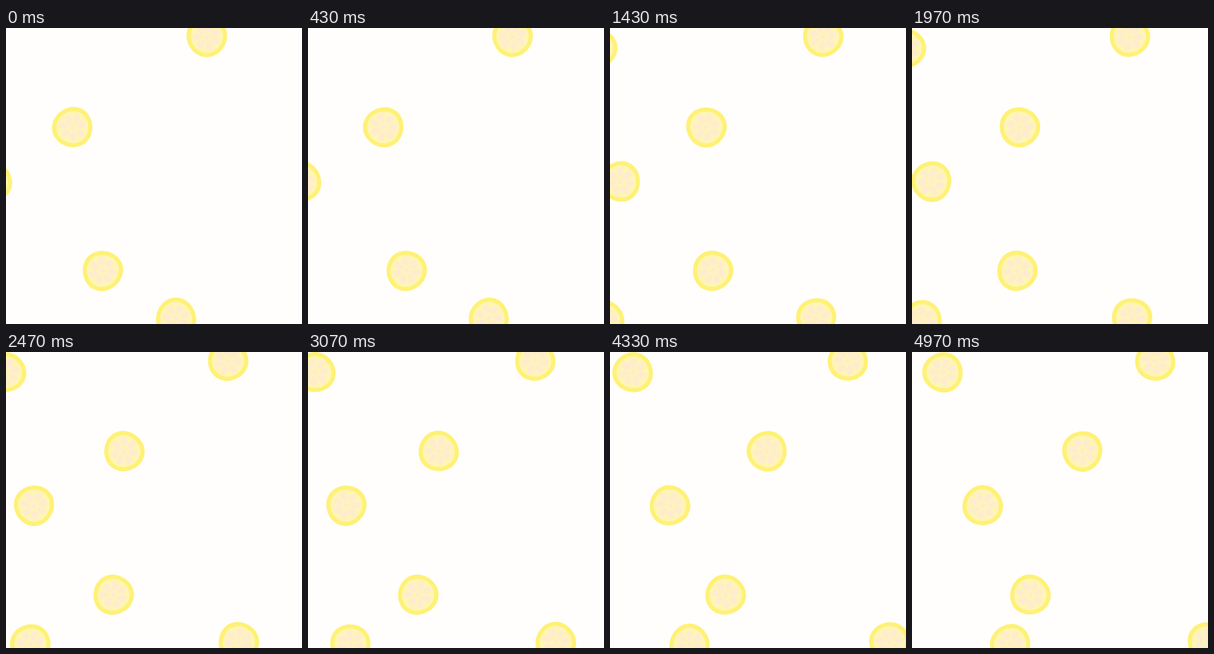
Animation of 432x432 px, one loop 5010 ms. Source, as an HTML page with a canvas:

```html
<!DOCTYPE html>
<html lang="en">
<head>
<meta charset="utf-8">
<title>Rolling lemon slices</title>
<style>
  html, body { margin: 0; width: 100%; height: 100%; overflow: hidden; background: #fffefd; }
  canvas { display: block; width: 432px; height: 432px; }
</style>
</head>
<body>
<canvas width="432" height="432"></canvas>
<script>
const ctx = document.querySelector('canvas').getContext('2d');
const LOOP = 5010, RAD = Math.PI / 180, SEEDS = 7;

// start x, y, speed in px/s, turn in degrees at x = 0
const slices = [
  [293, 12.8, 12.47, 279],
  [97, 144.8, 30.5, 75],
  [-20.6, 224, 24.9, 284],
  [141, 354.3, 6.35, 206],
  [248.2, 423.4, 36.9, 22],
  [-45, 29.7, 18.1, 15],
  [-70.6, 426.5, 43.1, 30]
];

// A circle with three soft corners
function blob(radius, color) {
  ctx.beginPath();
  for (let a = 0; a < 360; a += 4) {
    const r = radius * (1 + 0.018 * Math.cos(3 * a * RAD) + 0.007 * Math.cos(2 * a * RAD + 1));
    ctx.lineTo(r * Math.cos(a * RAD), r * Math.sin(a * RAD));
  }
  ctx.fillStyle = color;
  ctx.fill();
}

// A teardrop with its tip towards the centre
function seed() {
  ctx.beginPath();
  ctx.moveTo(5.5, 0);
  ctx.bezierCurveTo(9, -4, 12, -5.4, 15.5, -5);
  ctx.bezierCurveTo(21.5, -4, 21.5, 4, 15.5, 5);
  ctx.bezierCurveTo(12, 5.4, 9, 4, 5.5, 0);
  ctx.fill();
}

function slice(x, y, turn) {
  ctx.save();
  ctx.translate(x, y);
  ctx.rotate(turn * RAD);
  blob(29.4, '#fff176');
  blob(23.4, '#fff5b5');
  ctx.fillStyle = '#ffeccf';
  ctx.beginPath();
  ctx.arc(0, 0, 3.8, 0, 2 * Math.PI);
  ctx.fill();
  ctx.rotate(20 * RAD);
  for (let i = 0; i < SEEDS; i++) {
    seed();
    ctx.rotate(2 * Math.PI / SEEDS);
  }
  ctx.restore();
}

function draw() {
  const t = performance.now() % LOOP / 1000;
  ctx.fillStyle = '#fffefd';
  ctx.fillRect(0, 0, 432, 432);
  for (const [x0, y, speed, turn] of slices) {
    const x = x0 + speed * t;
    slice(x, y, turn + x);
  }
  requestAnimationFrame(draw);
}
draw();
</script>
</body>
</html>
```
